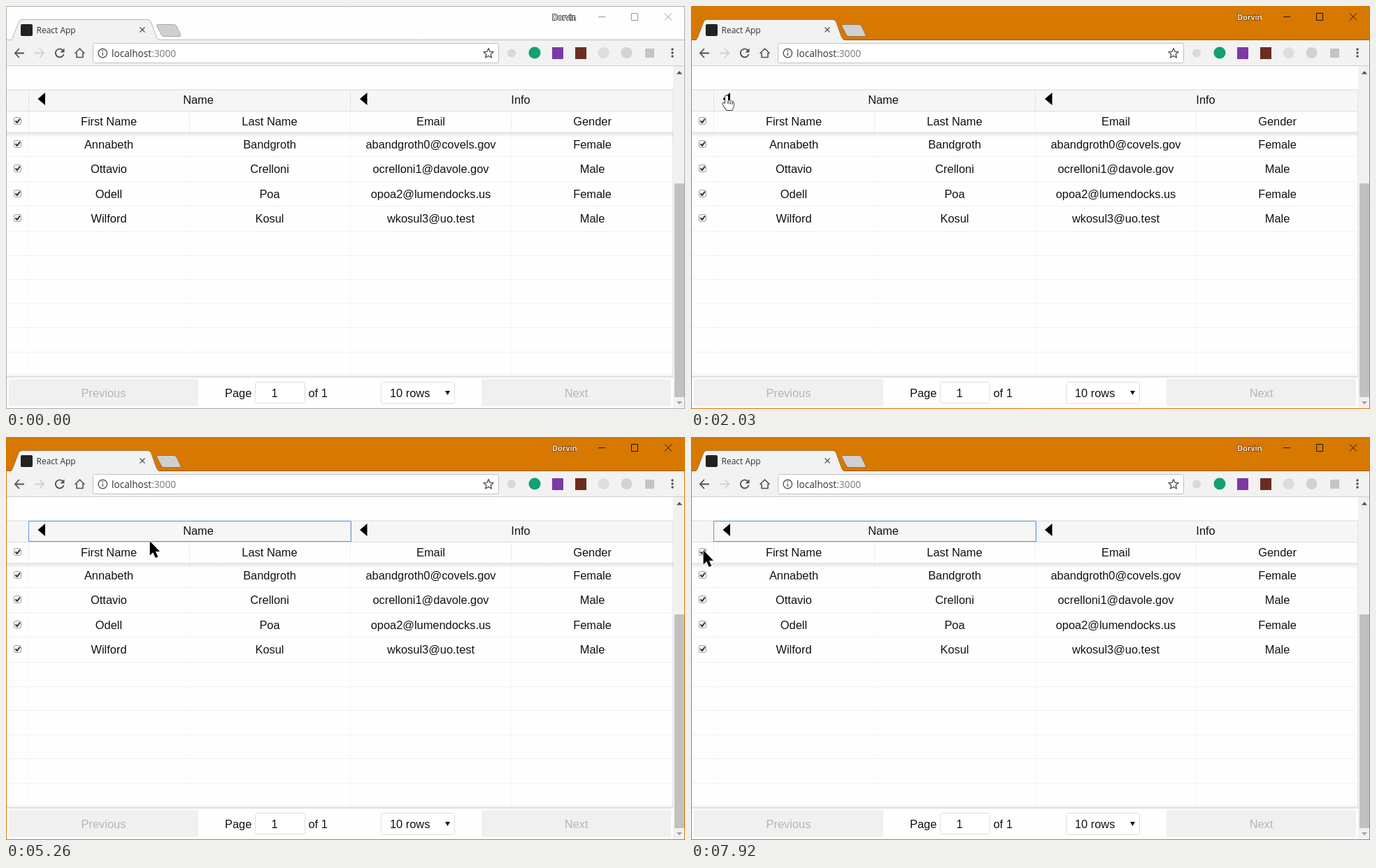
Write an HTML page with a canvas that moves like this. It is 971 px wide and 577 px high and loops after 8 s.

```html
<!DOCTYPE html>
<html lang="en">
<head>
<meta charset="utf-8">
<title>Table demo</title>
<style>
html, body { margin: 0; width: 100%; height: 100%; overflow: hidden; background: #fff; }
canvas { display: block; width: 971px; height: 577px; }
</style>
</head>
<body>
<canvas id="stage" width="971" height="577"></canvas>
<script>
const ctx = document.getElementById('stage').getContext('2d');
const LOOP = 8000, ACTIVE_AT = 2030, FOCUS_AT = 3320;
const ACCENT = '#d77800';
const EDGE = 'rgba(0,0,0,0.27)';
const TABLE_FONT = '16.4px "Liberation Sans", Arial, sans-serif';
const uiFont = size => `${size}px "Open Sans", sans-serif`;

const people = [
  ['Annabeth', 'Bandgroth', 'abandgroth0@covels.gov', 'Female'],
  ['Ottavio', 'Crelloni', 'ocrelloni1@davole.gov', 'Male'],
  ['Odell', 'Poa', 'opoa2@lumendocks.us', 'Female'],
  ['Wilford', 'Kosul', 'wkosul3@uo.test', 'Male']
];
const columns = [147, 377, 607.5, 838.5];

// Cursor moves: the pointer rests on the last point until the next move.
const moves = [
  { from: 370, to: 1150, steps: 11,
    path: [[663, 434], [600, 395], [400, 270], [170, 130], [70, 95], [49, 110], [47, 121]] },
  { from: 1240, to: 1540, steps: 5, path: [[46, 121], [49, 126], [51, 129]] },
  { from: 5260, to: 6030, steps: 11,
    path: [[205, 149], [430, 265], [660, 395], [820, 490], [890, 540], [911, 580]] },
  { from: 6730, to: 7370, steps: 9,
    path: [[877, 560], [800, 505], [650, 420], [450, 330], [270, 260], [120, 215], [40, 190], [2, 181], [-60, 175]] },
  { from: 7530, to: 7920, steps: 6, path: [[3, 159], [8, 157], [13, 160], [17, 162]] }
];

const arrowShape = new Path2D('M0.7 0V20.5L5.3 16.2L8.7 24L12.3 22.4L9 15H15Z');
const handShape = new Path2D('M-2 11V1Q-2-1 0-1Q2-1 2 1V7Q4 5 5 7.5Q7 6.3 8 8.5Q10 7.5 10 10V14L8 20H0L-5 13Q-6 9.5-4 9.5Z');
const starShape = new Path2D('M690 60.5L692 65.2L697 65.7L693.2 69L694.4 74L690 71.3L685.6 74L686.8 69L683 65.7L688 65.2Z');
const tabShape = new Path2D('M7 48.5Q9 47 10 44L18 23Q19.5 19.5 23 19.5H202Q206 19.5 207.5 23L215 44Q216 47 219 48.5');
const newTabShape = new Path2D('M217 26.5H240Q243 26.5 244 29L250 42Q250 43.5 248 43.5H226Q223 43.5 222 41L215.5 28Q215 26.5 217 26.5Z');

function rect(x, y, w, h, color) {
  ctx.fillStyle = color;
  ctx.fillRect(x, y, w, h);
}

function box(x, y, w, h, r, fill, stroke) {
  ctx.beginPath();
  ctx.roundRect(x, y, w, h, r);
  if (fill) { ctx.fillStyle = fill; ctx.fill(); }
  if (stroke) { ctx.strokeStyle = stroke; ctx.lineWidth = 1; ctx.stroke(); }
}

function disc(x, y, r, color) {
  ctx.beginPath();
  ctx.arc(x, y, r, 0, Math.PI * 2);
  ctx.fillStyle = color;
  ctx.fill();
}

function line(d, color, width = 1) {
  ctx.strokeStyle = color;
  ctx.lineWidth = width;
  ctx.stroke(new Path2D(d));
}

function shape(d, color) {
  ctx.fillStyle = color;
  ctx.fill(new Path2D(d));
}

function text(str, x, y, { font = TABLE_FONT, color = '#111', align = 'center' } = {}) {
  ctx.font = font;
  ctx.fillStyle = color;
  ctx.textAlign = align;
  ctx.fillText(str, x, y);
}

function fade(y, h, from, to) {
  const g = ctx.createLinearGradient(0, y, 0, y + h);
  g.addColorStop(0, `rgba(0,0,0,${from})`);
  g.addColorStop(1, `rgba(0,0,0,${to})`);
  rect(1, y, 953, h, g);
}

function drawUserLabel(active) {
  ctx.font = uiFont(11);
  ctx.textAlign = 'left';
  ctx.strokeStyle = active ? 'rgba(0,0,0,0.4)' : '#444';
  ctx.lineWidth = 2;
  ctx.lineJoin = 'round';
  ctx.strokeText('Dorvin', 781, 20);
  text('Dorvin', 781, 20, { font: '600 11px "Open Sans", sans-serif', color: '#fff', align: 'left' });
}

function drawTitleBar(active) {
  rect(0, 0, 971, 49, active ? ACCENT : '#fefefe');
  line('M0 48.5H8M218 48.5H971', EDGE);

  ctx.fillStyle = '#f2f2f2';
  ctx.fill(tabShape);
  rect(8, 48, 210, 1, '#f2f2f2');
  ctx.fillStyle = '#d0d0d0';
  ctx.fill(newTabShape);
  ctx.lineWidth = 1;
  ctx.strokeStyle = EDGE;
  ctx.stroke(newTabShape);
  ctx.stroke(tabShape);

  box(21, 26, 17, 17, 2, '#222222');
  text('React App', 43.5, 38.5, { font: uiFont(12), color: '#333', align: 'left' });
  line('M191.5 30.5L198.5 37.5M198.5 30.5L191.5 37.5', '#555', 1.3);

  drawUserLabel(active);
  line('M847 15.5H857M894.5 10.5H903.5V20.5H894.5ZM942 10.5L952 20.5M952 10.5L942 20.5', active ? '#1c1408' : '#999');
}

function drawToolbar() {
  rect(0, 49, 971, 37, '#f2f2f2');
  rect(0, 85, 971, 1, '#cfcfcf');
  const dark = '#505050';
  line('M26 67.5H13M19 61L12.8 67.5L19 74', dark, 1.8);
  line('M41 67.5H54M48 61L54.2 67.5L48 74', '#cfcfcf', 1.8);
  line('M81.5 63.5A6 6 0 1 0 82.6 69', dark, 1.8);
  shape('M83.5 60.5V66.5H77.5Z', dark);
  line('M98.5 68L105.5 61L112.5 68M101 67V73.5H110V67', dark, 1.6);

  box(124.5, 53.5, 580, 28, 2, '#fff', '#c2c2c2');
  line('M144.5 67.5A6.2 6.2 0 1 0 132.1 67.5A6.2 6.2 0 1 0 144.5 67.5M138.3 66.5V71', '#555', 1.4);
  rect(137.5, 63.3, 1.6, 1.7, '#555');
  const font = uiFont(13.65);
  text('localhost', 151, 72.5, { font, color: '#333', align: 'left' });
  text(':3000', 151 + ctx.measureText('localhost').width, 72.5, { font, color: '#777', align: 'left' });
  ctx.strokeStyle = '#555';
  ctx.lineWidth = 1.4;
  ctx.stroke(starShape);

  disc(723, 67.5, 6, '#d8d8d8');
  disc(756, 67, 8.5, '#14a06f');
  rect(781, 59, 16, 17, '#7b3aa5');
  rect(814, 59, 16, 17, '#6b2d20');
  disc(854.5, 67, 8, '#dddddd');
  disc(887.5, 67, 8, '#d2d2d2');
  rect(914, 61, 13, 13, '#c4c4c4');
  [62, 67, 72].forEach(y => disc(953, y, 1.7, '#505050'));
}

function drawCheckbox(y) {
  box(11.5, y - 4.5, 10, 10, 2, '#f1f1f1', '#a2a2a2');
  line(`M13.5 ${y + 0.5}L16 ${y + 3}L20 ${y - 2.5}`, '#333', 2.1);
}

function drawTable(focused) {
  rect(1, 86, 953, 490, '#fefefe');
  rect(1, 120, 953, 30, '#f6f6f6');
  rect(1, 119.5, 953, 1, '#d9d9d9');
  rect(1, 150, 953, 1, '#dedede');
  for (const x of [32, 492]) rect(x, 120, 1, 30, '#e2e2e2');
  for (const x of [32, 262, 492, 722]) {
    rect(x, 151, 1, 30, '#efefef');
    rect(x, 181, 1, 349, '#f7f7f7');
  }
  rect(953, 120, 1, 410, '#e6e6e6');
  for (const y of [215, 251, 286, 322, 357, 391, 426, 460, 495]) rect(1, y, 953, 1, '#f1f1f1');
  rect(1, 180, 953, 1, '#e7e7e7');
  fade(181, 7, 0.1, 0);

  for (const x of [45.5, 506]) shape(`M${x} 133L${x + 10.5} 124V142Z`, '#000');
  text('Name', 275, 140);
  text('Info', 736, 140);
  ['First Name', 'Last Name', 'Email', 'Gender'].forEach((s, i) => text(s, columns[i], 170.5));
  drawCheckbox(164);
  people.forEach((row, r) => {
    row.forEach((s, i) => text(s, columns[i], 203.5 + r * 35.5));
    drawCheckbox(Math.round(196.6 + r * 35.5));
  });
  if (focused) {
    ctx.strokeStyle = '#5596f5';
    ctx.lineWidth = 1;
    ctx.strokeRect(32.5, 120.5, 461, 29);
  }
}

function drawFooter() {
  fade(525, 5, 0, 0.05);
  rect(1, 530, 953, 2, '#e0e0e0');
  rect(1, 532, 953, 44, '#fefefe');
  box(4, 534, 271, 39, 3, '#f0f0f0');
  box(680, 534, 271, 39, 3, '#f0f0f0');
  text('Previous', 139.5, 559.5, { color: '#b5b5b5' });
  text('Next', 815.5, 559.5, { color: '#b5b5b5' });
  text('Page', 313, 559.5, { align: 'left' });
  box(356.5, 538.5, 71, 30, 3, '#fff', '#dedede');
  text('1', 384, 559.5);
  text('of 1', 432.5, 559.5, { align: 'left' });
  box(536.5, 538.5, 105, 31, 3, '#fff', '#dedede');
  text('10 rows', 549, 560, { align: 'left' });
  shape('M628 551H635L631.5 557Z', '#111');
}

function drawScrollbar() {
  rect(954, 86, 17, 490, '#f1f1f1');
  rect(956, 254, 14, 306, '#c1c1c1');
  shape('M959 97.5L963 93L967 97.5Z', '#505050');
  shape('M959 566L963 570.5L967 566Z', '#a3a3a3');
}

function cursorAt(t) {
  const move = moves.filter(m => t >= m.from).pop();
  if (!move) return null;
  const last = move.steps - 1;
  const step = Math.min(last, Math.floor((t - move.from) / (move.to - move.from) * last + 1e-6));
  const pos = step / last * (move.path.length - 1);
  const i = Math.min(Math.floor(pos), move.path.length - 2);
  const [a, b] = [move.path[i], move.path[i + 1]];
  return a.map((v, k) => v + (b[k] - v) * (pos - i));
}

function drawCursor(t) {
  const point = cursorAt(t);
  if (!point) return;
  const [x, y] = point;
  const hand = x > 33 && y >= 120 && y < 149;
  const outline = hand ? handShape : arrowShape;
  ctx.save();
  ctx.translate(x, y);
  ctx.lineJoin = 'round';
  ctx.lineWidth = hand ? 1.3 : 1.5;
  ctx.strokeStyle = hand ? '#000' : '#fff';
  ctx.fillStyle = hand ? '#fff' : '#000';
  ctx.stroke(outline);
  ctx.fill(outline);
  if (hand) line('M2 7V11M5 8V11.5M8 9V12', '#000', 1);
  ctx.restore();
}

function render(t) {
  const active = t >= ACTIVE_AT;
  drawTitleBar(active);
  drawToolbar();
  drawTable(t >= FOCUS_AT);
  drawFooter();
  drawScrollbar();
  ctx.strokeStyle = active ? ACCENT : '#a9a9a9';
  ctx.lineWidth = 1;
  ctx.strokeRect(0.5, 0.5, 970, 576);
  drawCursor(t);
}

const start = performance.now();
function tick() {
  render((performance.now() - start) % LOOP);
  requestAnimationFrame(tick);
}
tick();
</script>
</body>
</html>
```
